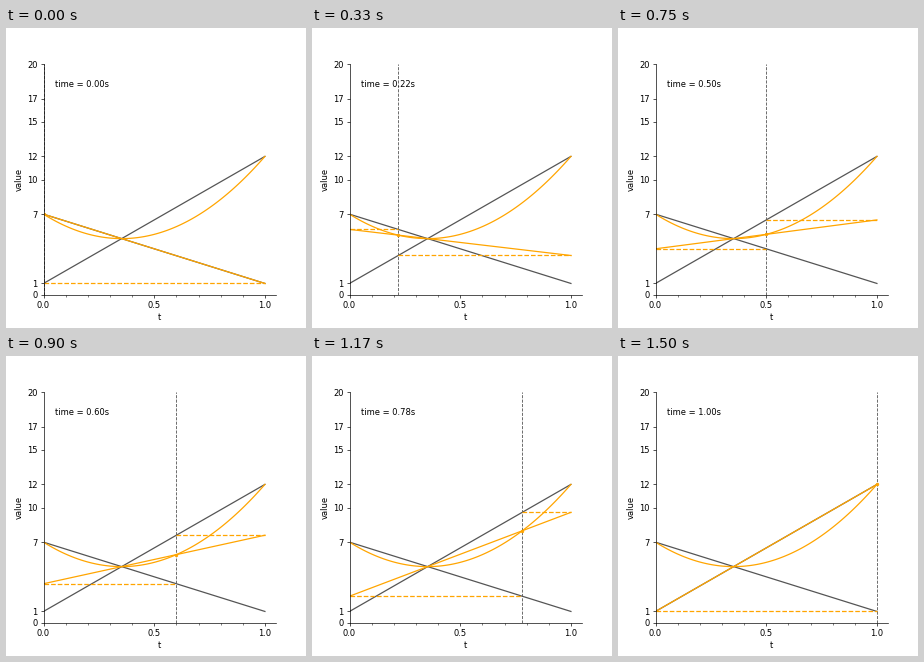
A matplotlib script for the animation above (1530 ms loop, 300 by 300 pixels).

```python
import numpy as np
import matplotlib.pyplot as plt
from matplotlib.animation import FuncAnimation
from matplotlib.ticker import AutoMinorLocator

STEPS = 50
INTERVAL = 30
GRAY = "#555555"
ORANGE = "orange"


def falling(t):
    return 7 - 6 * t


def rising(t):
    return 1 + 11 * t


def blend(t):
    return (1 - t) * falling(t) + t * rising(t)


fig, ax = plt.subplots(figsize=(5, 5), dpi=60)
ax.set_xlim(0, 1.05)
ax.set_ylim(0, 20)
ax.set_xticks([0, 0.5, 1])
ax.set_yticks([0, 1, 7, 10, 12, 15, 17, 20])
ax.xaxis.set_minor_locator(AutoMinorLocator(5))
ax.set_xlabel("t")
ax.set_ylabel("value")
ax.spines[["top", "right"]].set_visible(False)

# Fixed lines and the curve that blends them
ts = np.linspace(0, 1, 101)
ax.plot(ts, falling(ts), color=GRAY)
ax.plot(ts, rising(ts), color=GRAY)
ax.plot(ts, blend(ts), color=ORANGE)

# Moving parts
cursor = ax.axvline(0, color=GRAY, lw=1, ls="--")
low, = ax.plot([], [], color=ORANGE, ls="--")
high, = ax.plot([], [], color=ORANGE, ls="--")
chord, = ax.plot([], [], color=ORANGE)
dot, = ax.plot([], [], "o", color=ORANGE, ms=3)
label = ax.text(0.05, 0.9, "", transform=ax.transAxes)


def update(i):
    t = i / STEPS
    a, b = falling(t), rising(t)
    cursor.set_xdata([t, t])
    low.set_data([0, t], [a, a])
    high.set_data([t, 1], [b, b])
    chord.set_data([0, 1], [a, b])
    dot.set_data([t], [blend(t)])
    label.set_text(f"time = {t:.2f}s")
    return cursor, low, high, chord, dot, label


anim = FuncAnimation(fig, update, frames=STEPS + 1, interval=INTERVAL,
                     init_func=lambda: update(0), repeat=True)
plt.show()
```
